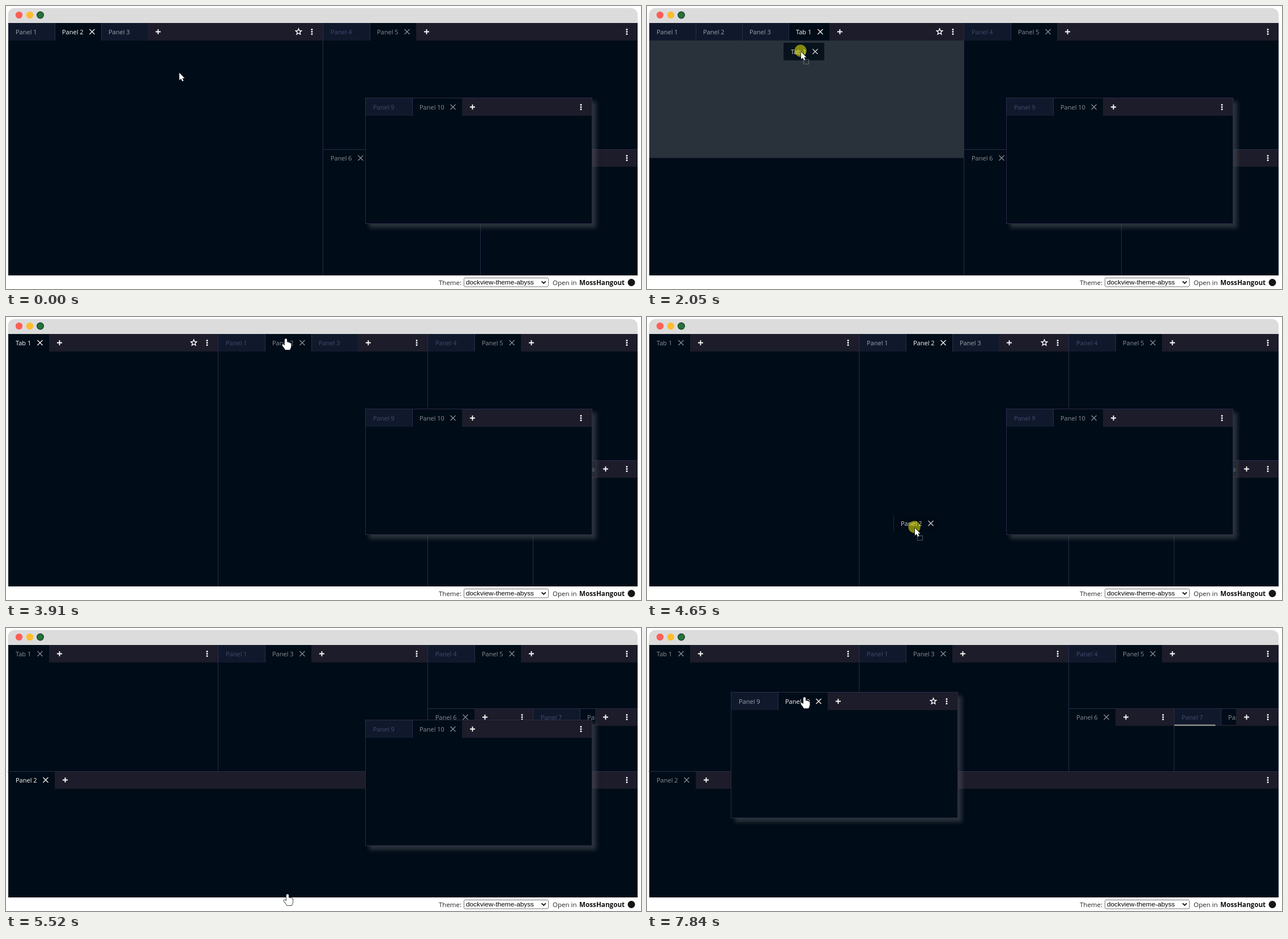
Recreate the animation shown at these times as an HTML page with a canvas. Size 1121 by 500 pixels, loop 8000 ms.

```html
<!DOCTYPE html>
<html lang="en">
<head>
<meta charset="utf-8">
<title>Dock layout demo</title>
<style>
  html, body { margin: 0; width: 100%; height: 100%; overflow: hidden; background: #fff; }
  canvas { display: block; }
</style>
</head>
<body>
<canvas id="stage" width="1121" height="500"></canvas>
<script>
const LOOP = 8000, STEP = 69;
const BG = '#000c18', HEADER = '#1c1c2a', TAB = '#10192c', LINE = '#2b2b4a';
const SHADE = 'rgba(83,89,93,.5)';
const UI = '"Open Sans", "Noto Sans", sans-serif';
const main = document.getElementById('stage').getContext('2d');
const layer = document.createElement('canvas');
layer.width = 1121;
layer.height = 500;
const layerCtx = layer.getContext('2d');
let g = main;

const smooth = p => p * p * (3 - 2 * p);
const easeIn = p => p * p;
const easeOut = p => 1 - (1 - p) ** 2;

// Each move: start time, number of steps, target x, target y, easing.
const cursorMoves = [
  [70, 6, 268, 38], [1090, 3, 302, 42], [1430, 4, 282, 46],
  [1840, 4, 272, 81, easeIn], [2116, 8, 86, 244], [2670, 2, 77, 244],
  [3290, 10, 494, 38], [4380, 5, 473, 373, easeIn], [4725, 7, 496, 478, easeOut],
  [5190, 1, 496, 473], [5520, 1, 497, 470], [5780, 8, 864, 175],
  [6530, 8, 542, 149, easeIn], [7082, 5, 378, 126, easeOut],
  [7427, 4, 279, 123], [7840, 1, 278, 122]
];
const floatMoves = [[6530, 8, 326, 136, easeIn], [7082, 5, 148, 113, easeOut]];

function positionAt(moves, x, y, t) {
  for (const [start, steps, tx, ty, ease = smooth] of moves) {
    const elapsed = t - start + 9;
    if (elapsed < 0) break;
    const e = ease(Math.min(1, (Math.floor(elapsed / STEP) + 1) / steps));
    x += (tx - x) * e;
    y += (ty - y) * e;
  }
  return [x, y];
}

function rect(x, y, w, h, color) {
  g.fillStyle = color;
  g.fillRect(x, y, w, h);
}

function disc(x, y, r, color) {
  g.fillStyle = color;
  g.beginPath();
  g.arc(x, y, r, 0, 7);
  g.fill();
}

function label(str, x, y, color, font = '11px ' + UI) {
  g.font = font;
  g.fillStyle = color;
  g.fillText(str, x, y);
}

function stroke(path, color, width) {
  g.strokeStyle = color;
  g.lineWidth = width;
  g.stroke(new Path2D(path));
}

function star(x, y) {
  g.beginPath();
  for (let i = 0; i < 10; i++) {
    const r = i % 2 ? 2.5 : 5.5, a = i * Math.PI / 5 - Math.PI / 2;
    g.lineTo(x + r * Math.cos(a), y + r * Math.sin(a));
  }
  g.closePath();
  g.strokeStyle = '#fff';
  g.lineWidth = 1.4;
  g.stroke();
}

const tabWidth = name => ({ 5: 72, 7: 82, 8: 88 })[name.length];

function tab(name, x, y, h, visible, focused, divider) {
  const w = tabWidth(name);
  const color = visible ? (focused ? '#fff' : '#8c9196') : (focused ? '#9fa3ab' : '#434a6e');
  rect(x, y, w, h, visible ? BG : TAB);
  if (divider) rect(x, y, 1, h, LINE);
  label(name, x + 13, y + 19.5, color);
  if (visible) {
    const cx = x + w - 16, cy = y + 15.5;
    stroke(`M${cx - 4.5} ${cy - 4.5}l9 9m0-9l-9 9`, color, 1.2);
  }
}

function group(x, y, right, bottom, names, active, focused) {
  const total = names.reduce((sum, n) => sum + tabWidth(n), 0);
  const tabsEnd = Math.min(x + total, right - 75);
  const overflow = tabsEnd < x + total;
  const cy = y + 15.5;
  rect(x, y, right - x, 31, HEADER);
  g.save();
  g.beginPath();
  g.rect(x, y, tabsEnd - x, 31);
  g.clip();
  let tx = x;
  names.forEach((name, i) => {
    tab(name, tx, y, overflow ? 29 : 31, i === active, focused, i > 0);
    tx += tabWidth(name);
  });
  if (overflow) rect(x, y + 28.5, (tabsEnd - x) ** 2 / total, 2.5, '#8b8e88');
  g.restore();
  stroke(`M${tabsEnd + 14} ${cy}h9m-4.5-4.5v9`, '#fff', 1.8);
  for (const d of [-4, 0, 4]) disc(right - 19, cy + d, 1.5, '#fff');
  if (focused) star(right - 42.5, cy);
}

function gridGroup(x, y, right, bottom, ...rest) {
  group(x, y, right, bottom, ...rest);
  if (x > 4) rect(x - 1, y, 1, bottom - y, LINE);
  if (y > 30) rect(x - 1, y, right - x + 1, 1, LINE);
}

const panels = (...ids) => ids.map(id => 'Panel ' + id);

function grid(t) {
  if (t < 3010) {
    const added = t >= 885;
    const names = panels(1, 2, 3).concat(added ? 'Tab 1' : []);
    gridGroup(4, 30, 559, 476, names, added ? 3 : 1, true);
    gridGroup(560, 30, 1115, 253, panels(4, 5), 1);
    gridGroup(560, 253, 837, 476, panels(6), 0);
    gridGroup(838, 253, 1115, 476, panels(7, 8), 1);
    return;
  }
  const split = t >= 5520;
  const bottom = split ? 253 : 476, middle = split ? 142 : 253;
  gridGroup(4, 30, 374, bottom, ['Tab 1'], 0, t < 4180);
  gridGroup(375, 30, 744, bottom, split ? panels(1, 3) : panels(1, 2, 3), 1, t >= 4180 && !split);
  gridGroup(745, 30, 1115, middle, panels(4, 5), 1);
  gridGroup(745, middle, 930, bottom, panels(6), 0);
  gridGroup(931, middle, 1115, bottom, panels(7, 8), 1);
  if (split) {
    gridGroup(4, 253, 1115, 476, panels(2), 0, t < 7355);
    if (t < 7355) rect(1060, 35, 1, 0, BG), hideStar(1072.5, 268.5);
  }
}

// The full-width bottom group has no star button.
function hideStar(x, y) {
  rect(x - 8, y - 8, 16, 16, HEADER);
}

function floatingGroup(t) {
  const [x, y] = positionAt(floatMoves, 634, 162, t);
  g = layerCtx;
  g.clearRect(0, 0, 1121, 500);
  g.save();
  g.shadowColor = SHADE;
  g.shadowBlur = 7;
  g.shadowOffsetX = g.shadowOffsetY = 7;
  rect(x, y, 401, 223, BG);
  g.restore();
  group(x + 1, y + 1, x + 400, y + 222, panels(9, 10), 1, t >= 7355);
  g.strokeStyle = LINE;
  g.lineWidth = 1;
  g.strokeRect(x + .5, y + .5, 400, 222);
  g = main;
  g.globalAlpha = t >= 6530 && t < 7355 ? .5 : 1;
  g.drawImage(layer, 0, 0);
  g.globalAlpha = 1;
}

function dropOverlay(x, y, left, right) {
  const w = right - left;
  if (y < 61) return;
  if (y > 466) rect(4, 458, 1111, 18, SHADE);
  else if (x < left + w * .2) rect(left, 61, w / 2, 415, SHADE);
  else if (y < 144) rect(left, 61, w, 207.5, SHADE);
  else if (y > 393) rect(left, 268.5, w, 207.5, SHADE);
}

function tabGhost(name, x, y) {
  g.globalAlpha = .82;
  tab(name, Math.round(x), Math.round(y), 31, true, true, name !== 'Tab 1');
  g.globalAlpha = 1;
}

const ARROW = new Path2D('M0 0V13L3 10.3 5.2 15 7.4 14 5.3 9.4H9.2Z');
const HAND = new Path2D('M-2 1.5Q0-1 2 1.5V6.5Q4 5.5 5 7.2Q7 6.5 7.6 8.4Q9.4 8 9.4 10V14Q9 17 7 20H-1Q-3 16-6 13Q-7 10.5-5 10.3Q-3.5 10.3-2 12.5Z');
const FINGERS = new Path2D('M-3 2L-4.5-4M-.5 1L-1.5-7M1.5 1L2.2-7M3.5 2L5.3-4.5M-1 5L-6.5 1.5');

function pointer(kind, x, y) {
  g.save();
  g.translate(x, y);
  g.lineJoin = g.lineCap = 'round';
  if (kind === 'grab') {
    g.strokeStyle = '#fff';
    g.lineWidth = 2.4;
    g.stroke(FINGERS);
    g.fillStyle = '#fff';
    g.beginPath();
    g.ellipse(.5, 3.5, 4.8, 4.6, 0, 0, 7);
    g.fill();
  } else {
    const shape = kind === 'hand' ? HAND : ARROW;
    g.strokeStyle = '#101820';
    g.lineWidth = 1.6;
    g.stroke(shape);
    g.fillStyle = '#fff';
    g.fill(shape);
  }
  if (kind === 'drag') {
    g.lineCap = 'butt';
    g.setLineDash([1, 1]);
    g.strokeStyle = '#a0a4a8';
    g.lineWidth = 1;
    g.strokeRect(4.5, 13.5, 9, 8);
  }
  g.restore();
}

const pointerKinds = [
  [345, 'arrow'], [1835, 'hand'], [3010, 'drag'], [3840, 'arrow'], [4375, 'hand'],
  [5520, 'drag'], [5775, 'hand'], [6200, 'arrow'], [7425, 'grab'], [LOOP, 'hand']
];
const pressed = [[820, 885], [1840, 3010], [4180, 5520], [6530, 7355]];

function frame() {
  rect(0, 0, 1121, 500, '#fff');
  g.fillStyle = '#dcdcdc';
  g.beginPath();
  g.roundRect(3.5, 3.5, 1111.5, 28, [12, 12, 0, 0]);
  g.fill();
  disc(23, 16, 6.2, '#ff5f57');
  disc(42, 16, 6.2, '#febc2e');
  disc(60.5, 16, 6.5, '#0c3b1c');
  disc(60.5, 16, 5.3, '#28713d');
  rect(4, 30, 1111, 446, BG);
}

function footer() {
  const font = '11.5px ' + UI;
  label('Theme:', 764, 493, '#222', font);
  label('Open in', 965, 493, '#222', font);
  label('MossHangout', 1012, 493, '#111', 'bold 11.7px ' + UI);
  disc(1104, 488.5, 6.5, '#151515');
  g.beginPath();
  g.roundRect(808.5, 480.5, 149, 15.5, 2);
  g.strokeStyle = '#767676';
  g.lineWidth = 1;
  g.stroke();
  label('dockview-theme-abyss', 812, 492, '#000', '11.8px Arial, "Liberation Sans", sans-serif');
  stroke('M945.5 486.3l3.7 3.7 3.7-3.7', '#111', 1.8);
}

function draw(t) {
  const [x, y] = positionAt(cursorMoves, 306, 118, t);
  const kind = pointerKinds.find(([end]) => t < end)[1];
  frame();
  grid(t);
  footer();
  if (kind === 'drag') t < 3010 ? dropOverlay(x, y, 4, 559) : dropOverlay(x, y, 375, 744);
  floatingGroup(t);
  if (kind === 'drag') {
    const [px, py] = positionAt(cursorMoves, 306, 118, t - STEP);
    const gx = x - (x - px) * .12, gy = y - (y - py) * .12;
    if (t < 3010) tabGhost('Tab 1', gx - 32, gy - 14);
    else tabGhost('Panel 2', gx - 39, gy - 10);
  }
  if (pressed.some(([from, to]) => t >= from && t < to)) {
    const shift = kind === 'drag' ? 1 : 0;
    disc(x - shift, y - 2 * shift, 10.7, 'rgba(255,255,0,.5)');
  }
  pointer(kind, x, y);
}

function tick() {
  draw(performance.now() % LOOP);
  requestAnimationFrame(tick);
}
tick();
</script>
</body>
</html>
```
